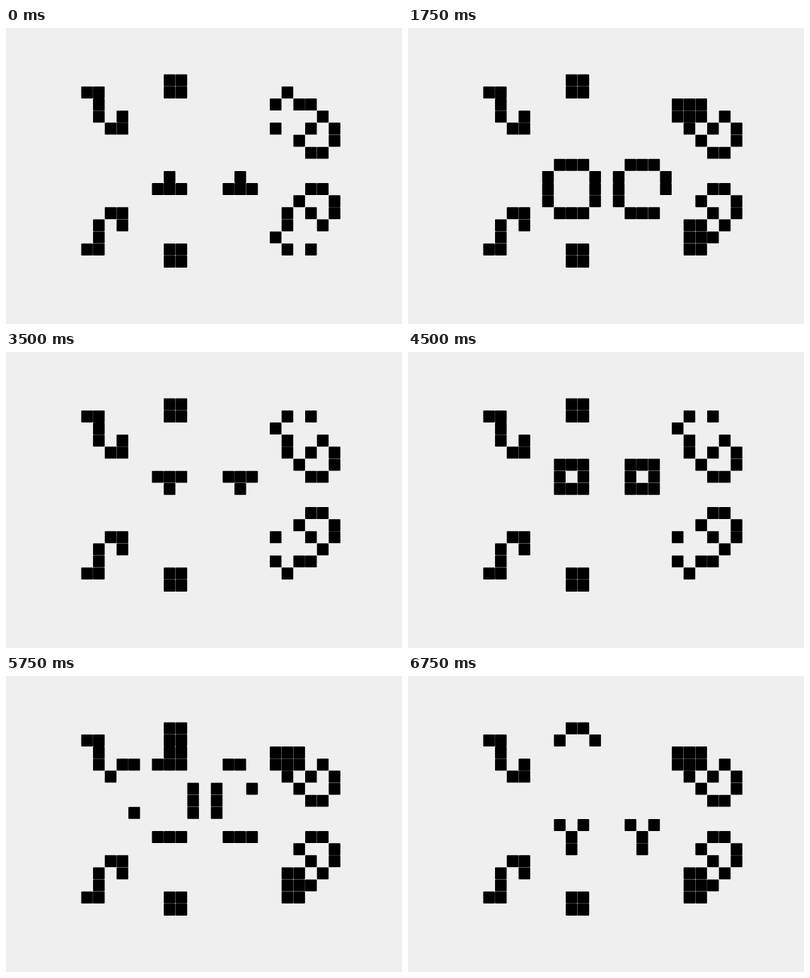
These frames come from a looping animation (560x420 px, 7 s). An HTML page:

```html
<!DOCTYPE html>
<html lang="en">
<head>
<meta charset="utf-8">
<title>Game of Life oscillator</title>
<style>
html, body { margin: 0; width: 100%; height: 100%; overflow: hidden; background: #efefef; }
svg { display: block; width: 560px; height: 420px; }
</style>
</head>
<body>
<svg id="stage" viewBox="0 0 560 420"></svg>
<script>
const COLS = 22, ROWS = 16, PERIOD = 28, STEP = 250;
const CELL_W = 50 / 3, CELL_H = 120 / 7, LEFT = 106.3, TOP = 65.7;

const seed = [
  ".......OO",
  "OO.....OO........O",
  ".O..............O.OO",
  ".O.O................O",
  "..OO............O..O.O",
  "..................O..O",
  "...................OO",
  "",
  ".......O.....O",
  "......OOO...OOO....OO",
  "..................O..O",
  "..OO.............O.O.O",
  ".O.O.............O..O",
  ".O..............O",
  "OO.....OO........O.O",
  ".......OO"
];

const makeGrid = rule => Array.from({ length: ROWS }, (_, y) =>
  Array.from({ length: COLS }, (_, x) => rule(x, y)));

function evolve(grid) {
  const at = (x, y) => (grid[y] && grid[y][x]) ? 1 : 0;
  return makeGrid((x, y) => {
    let n = -at(x, y);
    for (let dy = -1; dy <= 1; dy++)
      for (let dx = -1; dx <= 1; dx++) n += at(x + dx, y + dy);
    return n === 3 || (n === 2 && at(x, y) === 1);
  });
}

const generations = [makeGrid((x, y) => seed[y][x] === "O")];
while (generations.length < PERIOD) generations.push(evolve(generations[generations.length - 1]));

const stage = document.getElementById("stage");
const cells = makeGrid((x, y) => {
  const rect = document.createElementNS(stage.namespaceURI, "rect");
  const attrs = {
    x: LEFT + x * CELL_W + 0.1, y: TOP + y * CELL_H + 0.1,
    width: CELL_W - 0.2, height: CELL_H - 0.2, rx: 0.9
  };
  for (const name in attrs) rect.setAttribute(name, attrs[name]);
  stage.appendChild(rect);
  return rect;
});

let shown = -1;
function draw(ms) {
  const g = Math.floor(ms / STEP) % PERIOD;
  if (g === shown) return;
  shown = g;
  cells.forEach((row, y) => row.forEach((rect, x) =>
    rect.setAttribute("visibility", generations[g][y][x] ? "visible" : "hidden")));
}

const start = performance.now();
function tick() {
  draw(performance.now() - start);
  requestAnimationFrame(tick);
}
tick();
</script>
</body>
</html>
```
